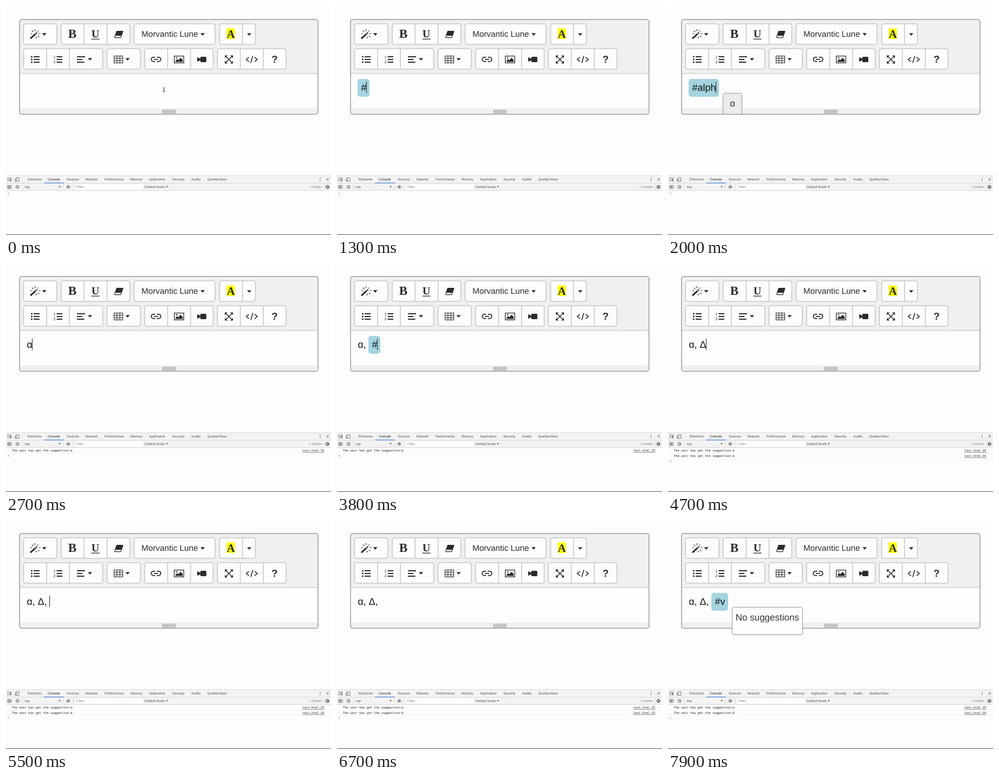
An HTML page that plays this animation: 600 by 424 pixels, repeating every 8000 ms.

```html
<!DOCTYPE html>
<html lang="en">
<head>
<meta charset="utf-8">
<title>Editor suggestions</title>
<style>
html, body { margin: 0; width: 100%; height: 100%; overflow: hidden; background: #fdfdfd; }
body { position: relative; font-family: "Liberation Sans", Arial, sans-serif; text-rendering: geometricPrecision; }
svg { position: absolute; left: 0; top: 0; }
.serif { font-family: "Liberation Serif", serif; font-weight: bold; }
.mono { font: 5.63px "DejaVu Sans Mono", monospace; }
.ui { font-size: 6.2px; fill: #505050; }
.icon { fill: none; stroke: #2a2a2a; }
#line {
  position: absolute; left: 38.4px; top: 135px; height: 33px;
  font-size: 18px; line-height: 33px; white-space: pre; color: #111;
}
#tag { display: inline-block; height: 33px; padding: 0 6px; border-radius: 5px; background: #a5d4df; }
#tag:empty { display: none; }
#caret { display: inline-block; position: relative; width: 0; }
#tag:not(:empty) + #caret { margin-left: -6px; }
#bar { position: absolute; left: 0; bottom: -4px; width: 1px; height: 21px; background: #222; }
#menu {
  position: absolute; left: 12.3px; top: 4px; overflow: hidden;
  border: 1.5px solid #949494; border-radius: 4px; background: #fdfdfd;
  font-size: 17px; line-height: 38px; text-align: center; color: #333;
}
#menu:empty { display: none; }
#menu div { height: 38px; padding: 0 12.5px; border-radius: 3px; }
#menu div:first-child { background: #ebebeb; }
#menu.none { height: 50px; }
#menu.none div { padding: 0 6px; background: none; }
</style>
</head>
<body>
<svg id="scene" width="600" height="424" viewBox="0 0 600 424"></svg>
<div id="line"><span id="plain"></span><span id="tag"></span><span id="caret"><i id="bar"></i><div id="menu"></div></span></div>
<script>
const $ = id => document.getElementById(id);
const rect = (x, y, w, h, fill, extra = '') =>
  `<rect x="${x}" y="${y}" width="${w}" height="${h}" fill="${fill}" ${extra}/>`;
const path = (d, width = 1, extra = '') =>
  `<path class="icon" d="${d}" stroke-width="${width}" ${extra}/>`;
const shape = (d, fill = '#2a2a2a') => `<path d="${d}" fill="${fill}"/>`;
const text = (x, y, words, extra = 'class="ui"') => `<text x="${x}" y="${y}" ${extra}>${words}</text>`;
const arrow = (x, y) => shape(`M${x - 4} ${y - 2.3}h8l-4 4.6z`);
const smallArrow = (x, y) => shape(`M${x - 1.8} ${y - 1.5}h3.6l-1.8 3z`, '#555');

const group = (x, y, right, dividers = []) =>
  rect(x, y, right - x, 38, '#fdfdfd', 'rx="3.5" stroke="#c8c8c8" stroke-width="1.6"') +
  dividers.map(d => rect(d - .8, y, 1.6, 38, '#c8c8c8')).join('');

const frame =
  rect(25, 25, 551, 175.5, '#fdfdfd', 'rx="4"') +
  shape('M25 125V29q0-4 4-4H572q4 0 4 4V125z', '#f0f0f0') +
  rect(25, 124.3, 551, 1.4, '#d0d0d0') +
  rect(25, 189.5, 551, 11, '#f0f0f0') +
  [192.5, 195, 197.5].map(y => rect(288, y, 25.5, 1.1, '#8f8f8f')).join('') +
  rect(25, 25, 551, 175.5, 'none', 'rx="4" stroke="#9b9b9b" stroke-width="1.5"');

const groups =
  group(32.5, 33, 94) + group(102, 33, 228.5, [144.3, 186.6]) +
  group(236.5, 33, 386) + group(394.5, 33, 460.5, [436.6]) +
  group(32.5, 79, 178.5, [75, 117]) + group(186.5, 79, 248) +
  group(256, 79, 382.5, [298.4, 340.7]) + group(390.3, 79, 517, [432.6, 475]);

const rowOne =
  path('M45 60.3L54.6 51.6', 3) + path('M55.3 51L57.3 49.2', 2.6) +
  path('M53.5 43v3.5M47.8 45.6l2.4 2.4M45 51h3.3M59.5 45.6l-1.8 1.8M60.2 51h3.6M59 55.2l2.4 2.4M55.6 57v3', 1.2) +
  arrow(70.6, 52.6) +
  text(122.4, 59.2, 'B', 'class="serif" font-size="23" text-anchor="middle" fill="#2a2a2a"') +
  text(165, 58.3, 'U', 'class="serif" font-size="20" text-anchor="middle" fill="#2a2a2a"') +
  rect(157.6, 60.6, 15, 1.3, '#2a2a2a') +
  path('M205 46.6h10.2q.9 0 .6.9l-3.7 10.3q-.3.8-1.2.8H201.200q-1 0-.7-.9l3.600-10.300q.300-.800.900-.800z', 1.2) +
  shape('M205 46.400h10.800L212.800 55H201.500l2.700-8z') +
  text(250, 57, 'Morvantic Lune', 'font-size="15.3" fill="#2a2a2a"') + arrow(363, 52.6) +
  rect(407.5, 41.5, 15, 19.5, '#ff0') +
  text(415, 59.300, 'A', 'class="serif" font-size="21" text-anchor="middle" fill="#2a2a2a"') +
  arrow(449, 52.8);

const bulletRows = [94, 99, 104];
const rowTwo =
  bulletRows.map(y => rect(46, y - 1.3, 2.8, 2.6, '#2a2a2a') + rect(51, y - 1, 11, 2, '#2a2a2a') +
    rect(93.5, y - 1, 10.5, 2, '#2a2a2a')).join('') +
  text(87.6, 97.300, '1', 'font-size="7" fill="#2a2a2a"') + text(87.6, 105.800, '2', 'font-size="7" fill="#2a2a2a"') +
  path('M131 94h15M131 99h10M131 104h13.500', 2) + arrow(155, 98.8) +
  path('M199.500 92.500h16v13h-16zM199.500 96.800h16M199.500 101.200h16M204.800 92.500v13M210.200 92.500v13', 1.1) +
  arrow(224.500, 98.8) +
  path('M275.500 94.800h-3.200a4 4 0 0 0 0 8h3.200M278.500 94.800h3.200a4 4 0 0 1 0 8h-3.200M273 98.800h8', 1.8) +
  path('M310.700 92.700h17.500v12.600h-17.500z', 1.3) +
  shape('M313 103.500v-2l3.300-3.300 2 2 4-4.400 4 4.500v3.200z') + '<circle cx="315" cy="96" r="1.3" fill="#2a2a2a"/>' +
  rect(358.800, 94, 11, 10, '#2a2a2a', 'rx="1.500"') + shape('M353 94.800l6 3v2.400l-6 3z') +
  path('M406 93.500L417 104.500M417 93.500L406 104.500', 1.5) +
  shape('M404 91.500h5l-5 5zM419 91.500h-5l5 5zM404 106.500h5l-5-5zM419 106.500h-5l5-5z') +
  path('M448.500 94.800L443.500 99l5 4.200M459 94.800l5 4.200-5 4.200M455.700 92.500l-3.800 13', 1.6) +
  text(496, 105.300, '?', 'font-size="18.500" font-weight="bold" text-anchor="middle" fill="#2a2a2a"');

const tabs = [['Elements', 40], ['Console', 77], ['Sources', 112], ['Network', 146.5], ['Performance', 182],
  ['Memory', 229.5], ['Application', 264], ['Security', 307], ['Audits', 342], ['Quellad Maxi', 371.5]];
const devtools =
  rect(0, 314, 600, 27.500, '#f3f3f3') + rect(0, 313.6, 600, .8, '#cfcfcf') +
  rect(0, 327.700, 600, .8, '#cfcfcf') + rect(0, 341.200, 600, .8, '#d0d0d0') +
  rect(70, 327, 37, 1.200, '#4a86dc') + rect(0, 422.700, 600, 1.300, '#777') +
  tabs.map(([name, x]) => text(x, 323.300, name, `class="ui" ${name == 'Console' ? 'style="fill:#222"' : ''}`)).join('') +
  '<g opacity=".75">' +
  path('M9.500 321v-2.700h-6v5.600h2.600', .8) + shape('M6.500 320l4 1.600-1.700.7 1.700 2-.7.6-1.700-2-.9 1.500z') +
  path('M19 318h5v6.500h-5zM19 320h-2.200v4.500h2.200', .8) +
  [318.500, 321, 323.500].map(y => `<circle cx="580" cy="${y}" r=".8" fill="#333"/>`).join('') +
  path('M591.500 318.800l4.400 4.400M595.900 318.800l-4.400 4.400', .9) +
  path('M3 332.300h6.800v5.400H3zM5 332.300v5.400', .8) + shape('M6 333.300l2.700 1.700L6 336.700z') +
  '<circle class="icon" cx="21.300" cy="335" r="2.800"/>' + path('M19.300 333l4 4', 1) +
  path('M111.200 335q3.800-4.800 7.600 0q-3.800 4.800-7.600 0z', .9) + '<circle cx="115" cy="335" r="1.400" fill="#333"/>' +
  '<circle class="icon" cx="593.500" cy="335" r="2.100" stroke-width="1.500"/>' +
  '<circle class="icon" cx="593.500" cy="335" r="3.300" stroke-dasharray="1.300 1.290"/></g>' +
  [30, 105.500, 124.500, 587].map(x => rect(x, 330, .7, 10, '#d0d0d0')).join('') +
  rect(127.500, 330, 125, 10, '#fdfdfd') +
  text(35, 337, 'top') + smallArrow(99, 335) +
  text(130, 337.200, 'Filter', 'class="ui" style="fill:#858585"') +
  text(256, 337, 'Default levels') + smallArrow(297, 335) +
  text(560, 337, '1 hidden', 'class="ui" style="fill:#888"');

const logRow = (id, y, letter) => `<g id="${id}">` +
  text(10.800, y, 'The uesr has get the suggestion:' + letter, 'class="mono" fill="#222"') +
  text(547, y, 'test.html:35', 'class="mono" fill="#333" text-decoration="underline"') +
  rect(0, y + 2.400, 600, .6, '#ececec') + '</g>';

$('scene').innerHTML = frame + groups + rowOne + rowTwo + devtools +
  logRow('log1', 349.300, 'α') + logRow('log2', 358.900, 'Δ') +
  path('M3.300 345.700l2 1.600-2 1.600', .8, 'id="prompt" style="stroke:#3f6fd8"') +
  path('M289.600 151.300q1.900 0 1.900 1.200v5.500q0 1.200-1.900 1.200M293.400 151.300q-1.900 0-1.900 1.200v5.500q0 1.200 1.900 1.200M290.400 156.500h2.200', .9, 'id="pointer"');

// [start ms, plain text, tag text, caret visible, menu entries]
const A = 'ɑ', B = 'ɑ, ', C = 'ɑ, Δ, ', NONE = 'No suggestions';
const steps = [
  [0, '', '', 0], [100, '', '', 1], [300, '', '', 0], [600, '', '', 1],
  [800, '', '#', 1], [1100, '', '#', 0], [1300, '', '#', 1],
  [1600, '', '#a', 1], [1700, '', '#a', 1, A], [1800, '', '#al', 1, A], [1900, '', '#alp', 1, A],
  [2000, '', '#alph', 1, A], [2100, '', '#alpha', 1, A],
  [2300, A, '', 1], [2400, A, '', 0], [2700, A, '', 1], [2900, 'ɑ,', '', 1], [3000, B, '', 1],
  [3200, B, '#', 1], [3400, B, '#', 0], [3500, B, '#', 1], [3700, B, '#', 0], [3800, B, '#', 1],
  [3900, B, '#D', 1], [4000, B, '#D', 1, 'Δ'], [4100, B, '#De', 1, 'Δ'], [4200, B, '#Del', 1, 'Δ'],
  [4300, B, '#Delt', 1, 'Δ'], [4500, B, '#Delta', 1, 'Δ'],
  [4700, 'ɑ, Δ', '', 1], [4900, 'ɑ, Δ', '', 0], [5200, 'ɑ, Δ', '', 1], [5300, 'ɑ, Δ,', '', 1], [5500, C, '', 1],
  [5800, C, '#', 1], [5900, C, '#p', 1], [6000, C, '#p', 1, 'πφψ'], [6200, C, '#p', 0, 'πφψ'],
  [6400, C, '#p', 1, 'πφψ'], [6500, C, '#', 1], [6600, C, '', 1], [6700, C, '', 0],
  [6900, C, '', 1], [7200, C, '', 0], [7400, C, '#', 1], [7600, C, '#v', 1],
  [7700, C, '#v', 1, NONE], [7900, C, '#v', 0, NONE]
];

const show = (id, on) => $(id).style.visibility = on ? 'visible' : 'hidden';
let current;

function render(step) {
  const [start, plain, tag, caretOn, menu = ''] = step;
  $('plain').textContent = plain;
  $('tag').textContent = tag;
  show('bar', caretOn);
  const entries = menu === NONE ? [menu] : [...menu];
  $('menu').className = menu === NONE ? 'none' : '';
  $('menu').innerHTML = entries.map(entry => `<div>${entry}</div>`).join('');
  const logs = (start >= 2300) + (start >= 4700);
  show('log1', logs > 0);
  show('log2', logs > 1);
  $('prompt').setAttribute('transform', `translate(0 ${logs * 9.600})`);
  show('pointer', start < 800);
}

function tick() {
  const now = performance.now() % 8000;
  const step = steps.findLast(([start]) => start <= now);
  if (step !== current) render(current = step);
  requestAnimationFrame(tick);
}
tick();
</script>
</body>
</html>
```
